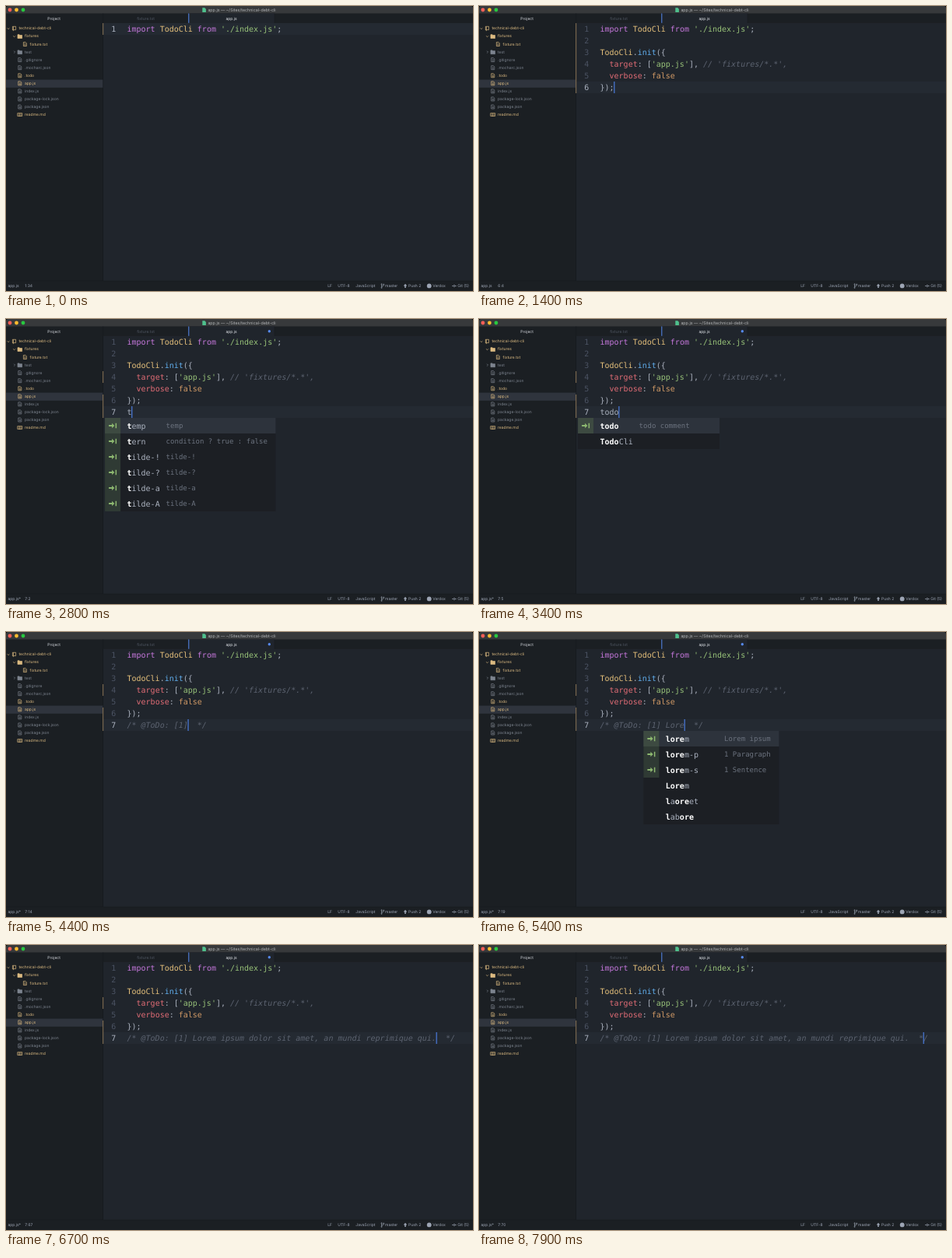
Animation of 600x366 px, one loop 8000 ms. Source, as an HTML page:

```html
<!DOCTYPE html>
<html lang="en">
<head>
<meta charset="utf-8">
<title>Editor typing</title>
<style>
  html, body { margin: 0; width: 100%; height: 100%; overflow: hidden; background: #000; }
  svg { display: block; width: 100vw; height: 100vh; }
  text { white-space: pre; text-rendering: geometricPrecision; }
  .ui { font: 5px Inter, sans-serif; fill: #9da5b4; }
  .mid { text-anchor: middle; }
  .code { font: 10px "DejaVu Sans Mono", monospace; fill: #abb2bf; }
  .label { font-size: 9.03px; fill: #6b727e; }
  .num { text-anchor: end; fill: #4b5363; }
  .num.active { fill: #abb2bf; }
  .kw { fill: #c678dd; }
  .cls { fill: #e5c07b; }
  .str { fill: #98c379; }
  .fn { fill: #61afef; }
  .key { fill: #e06c75; }
  .lit { fill: #d19a66; }
  .note { fill: #5c6370; font-style: italic; }
  .hit { fill: #fff; font-weight: bold; }
  .line { fill: none; stroke-width: .7; }
</style>
</head>
<body>
<svg viewBox="0 0 600 366" preserveAspectRatio="none">
  <path d="M0 366V3Q0 0 3 0H597Q600 0 600 3V366Z" fill="#1b1f23"/>
  <path d="M0 9.5V3Q0 0 3 0H597Q600 0 600 3V9.5Z" fill="#37393b"/>
  <circle cx="5" cy="5" r="2.4" fill="#fe5f57"/>
  <circle cx="13.5" cy="5" r="2.4" fill="#febc2e"/>
  <circle cx="22" cy="5" r="2.4" fill="#28c840"/>
  <path d="M252.3 2.3h3l1.6 1.6v4.1h-4.6z" fill="#4fc08d"/>
  <text class="ui" x="259.4" y="7" style="font-size:5.3px;fill:#b4b6b8">app.js — ~/Sites/technical-debt-cli</text>

  <rect x="125" y="21.8" width="475" height="331.2" fill="#20252c"/>
  <rect x="235" y="9.5" width="110" height="12.5" fill="#20252c"/>
  <path d="M124.6 9.5V353M345 9.5V21.8M0 353H600" stroke="#16191d" stroke-width=".5"/>
  <rect x="234.3" y="9.5" width="1" height="12.3" fill="#568af2"/>
  <text class="ui mid" x="61.5" y="17.6" style="fill:#d7dae0">Project</text>
  <text class="ui mid" x="179.5" y="17.6" style="fill:#505763">fixture.txt</text>
  <text class="ui mid" x="289.5" y="17.6" style="fill:#e4e7ec">app.js</text>

  <rect x="0" y="94.6" width="124.4" height="10.2" fill="#2f343d"/>
  <g id="tree"></g>

  <g class="ui">
    <text x="413.3" y="361.3">LF</text>
    <text x="426.3" y="361.3">UTF-8</text>
    <text x="449.3" y="361.3">JavaScript</text>
    <text x="487" y="361.3">master</text>
    <text x="517" y="361.3">Push 2</text>
    <text x="548.2" y="361.3">Verdox</text>
    <text x="580.3" y="361.3">Git (5)</text>
  </g>
  <g class="line" stroke="#9da5b4">
    <path d="M482.6 357.8v3.4M485.2 358v.6q0 1.2-2.6 1.4"/>
    <circle cx="482.6" cy="357.3" r=".6"/><circle cx="482.6" cy="361.8" r=".6"/><circle cx="485.2" cy="357.6" r=".6"/>
    <path d="M573 359.5h1.7M577 359.5h1.7"/><circle cx="575.9" cy="359.5" r="1.1"/>
  </g>
  <path d="M513 356.8l2.3 2.6h-1.5v2.6h-1.6v-2.6h-1.5z" fill="#9da5b4"/>
  <circle cx="543.7" cy="359.4" r="2.9" fill="#9da5b4"/>

  <g id="live"></g>
</svg>

<script>
const LOOP = 8000, LEFT = 155.5, ADVANCE = 6.02, TOP = 22, PITCH = 15;
const TAN = '#dcbb82', GRAY = '#7d848f';
const tree = document.getElementById('tree');
const live = document.getElementById('live');

const rect = (x, y, w, h, fill) => `<rect x="${x}" y="${y}" width="${w}" height="${h}" fill="${fill}"/>`;
const text = (cls, x, y, body) => `<text class="${cls}" x="${x}" y="${y}">${body}</text>`;
const span = (cls, body) => `<tspan class="${cls}">${body}</tspan>`;

// Project tree: name, kind, indent, colour
const entries = [
  ['technical-debt-cli', 'repo', 16.4, TAN], ['fixtures', 'open', 24, TAN],
  ['fixture.txt', 'file', 30.6, TAN], ['test', 'closed', 24, GRAY],
  ['.gitignore', 'file', 24, GRAY], ['.mocharc.json', 'file', 24, GRAY],
  ['.todo', 'file', 24, TAN], ['app.js', 'file', 24, TAN],
  ['index.js', 'file', 24, GRAY], ['package-lock.json', 'file', 24, GRAY],
  ['package.json', 'file', 24, GRAY], ['readme.md', 'book', 24, TAN]
];
const folder = '<path d="M-2.8-2.2h2.2l.6.8h2.8v4h-5.6z" fill="currentColor"/>';
const down = 'M-8.6-.6l1.4 1.4 1.4-1.4';
const icons = {
  repo: `<path d="M-1.8 2V-2.6H2.4V1.7H-1.8M-.8 1.7V3.2M-.6-2.4V1.4${down}"/>`,
  open: `${folder}<path d="${down}"/>`,
  closed: `${folder}<path d="M-7.6-1.4l1.4 1.4-1.4 1.4"/>`,
  file: '<path d="M-2-2.5H.8L2-1.3V2.5H-2zM-1-.3H1M-1 1.1H1"/>',
  book: '<path d="M-3-1.9H3V1.8H-3zM0-1.9V2.4M-2-.5H-1M1-.5H2M-2 .7H-1M1 .7H2"/>'
};
tree.innerHTML = entries.map(([name, kind, x, color], i) => {
  const y = 28.9 + i * 10.06;
  return `<g class="line" transform="translate(${x - 6.2} ${y})" stroke="currentColor" color="${color}">${icons[kind]}</g>` +
    `<text class="ui" x="${x}" y="${y + 1.5}" style="fill:${color}">${name}</text>`;
}).join('');

const code = [
  `${span('kw', 'import')} ${span('cls', 'TodoCli')} ${span('kw', 'from')} ${span('str', "'./index.js'")};`,
  '',
  `${span('cls', 'TodoCli')}.${span('fn', 'init')}({`,
  `  ${span('key', 'target')}: [${span('str', "'app.js'")}], ${span('note', "// 'fixtures/*.*',")}`,
  `  ${span('key', 'verbose')}: ${span('lit', 'false')}`,
  '});'
];

// Completion lists: column, label position, right edge, items [word, label]
const lists = {
  t: { col: 0, labelX: 205.6, right: 346.5, items: [
    ['temp', 'temp'], ['tern', 'condition ? true : false'], ['tilde-!', 'tilde-!'],
    ['tilde-?', 'tilde-?'], ['tilde-a', 'tilde-a'], ['tilde-A', 'tilde-A']] },
  todo: { col: 0, labelX: 205.6, right: 309, items: [['todo', 'todo comment'], ['TodoCli']] },
  lore: { col: 14, labelX: 315, right: 385.5, items: [
    ['lorem', 'Lorem ipsum'], ['lorem-p', '1 Paragraph'], ['lorem-s', '1 Sentence'],
    ['Lorem'], ['laoreet'], ['labore']] },
  lorem: { col: 14, labelX: 290.8, right: 360.5, items: [
    ['lorem', 'Lorem ipsum'], ['lorem-p', '1 Paragraph'], ['lorem-s', '1 Sentence']] }
};

// Editing steps: time, line, column, typed text, list, selected item
const OPEN = '/* @ToDo: ', CLOSE = '  */';
const note = s => OPEN + s + CLOSE;
const full = note('[1] Lorem ipsum dolor sit amet, an mundi reprimique qui.');
const steps = [
  [0, 1, 34], [1100, 2, 1], [1200, 3, 1], [1400, 6, 4], [2000, 7, 1, ''],
  [2600, 7, 2, 't'], [2700, 7, 2, 't', 't'], [3000, 7, 3, 'to', 'todo'],
  [3100, 7, 4, 'tod', 'todo'], [3200, 7, 5, 'todo', 'todo'],
  [3500, 7, 11, note('')], [4000, 7, 12, note('[]')],
  [4200, 7, 13, note('[1]')], [4400, 7, 14, note('[1]')], [4600, 7, 15, note('[1] ')],
  [4800, 7, 16, note('[1] L')], [4900, 7, 16, note('[1] L'), 'lore'],
  [5000, 7, 17, note('[1] Lo'), 'lore'], [5200, 7, 18, note('[1] Lor'), 'lore'],
  [5400, 7, 19, note('[1] Lore'), 'lore'], [5500, 7, 20, note('[1] Lorem'), 'lorem'],
  [6100, 7, 20, note('[1] Lorem'), 'lorem', 1],
  [6600, 7, 67, full], [7700, 7, 68, full], [7800, 7, 69, full], [7900, 7, 70, full]
];
const cursorOff = [[0, 200], [600, 1100], [1800, 2000], [2400, 2600], [3900, 4000], [5900, 6100], [7000, 7400]];

// Emphasise the letters of a word that match the typed prefix in order
function highlight(word, prefix) {
  let n = 0;
  return [...word].map(c =>
    n < prefix.length && c.toLowerCase() === prefix[n].toLowerCase() ? (n++, span('hit', c)) : c).join('');
}

function popup({ col, labelX, right, items }, prefix, selected) {
  const wordX = LEFT + col * ADVANCE, x = wordX - 28.4, y = 127;
  return rect(x, y, right - x, items.length * 20, '#1c1f24') + items.map(([word, label], i) => {
    const top = y + i * 20, mid = top + 10;
    let row = i === selected ? rect(x, top, right - x, 20, '#2d333c') : '';
    if (label) {
      row += rect(x, top, 20, 20, i === selected ? '#3d4a41' : '#2f3a34') +
        `<path transform="translate(${x + 10} ${mid})" d="M-5-1H-1V-3.2L2.3 0-1 3.2V1H-5zM3.5-3.2H5V3.2H3.5z" fill="#8db870"/>` +
        text('code label', labelX, mid + 3.2, label);
    }
    return row + text('code', wordX, mid + 3.5, highlight(word, prefix));
  }).join('');
}

function draw([time, line, col, typed, list, selected = 0], cursorOn) {
  const rows = time < 1400 ? [...code.slice(0, 1), ...Array(line - 1).fill('')] : [...code];
  if (line === 7) rows.push(typed.startsWith(OPEN) ? span('note', typed) : typed);
  const lineTop = n => TOP + (n - 1) * PITCH;
  const dirty = line === 7 || line === 2 || line === 3;
  const marked = line === 7 ? [4, 6, 7] : rows.map((_, i) => i + 1);

  let out = rect(125, lineTop(line), 475, PITCH, '#242a32');
  out += marked.map(n => rect(124.2, lineTop(n), 1, PITCH, '#8c7557')).join('');
  rows.forEach((body, i) => {
    const y = lineTop(i + 1) + 11.1;
    out += text(i + 1 === line ? 'code num active' : 'code num', 141.2, y, i + 1) + text('code', LEFT, y, body);
  });
  if (cursorOn) out += rect(LEFT + (col - 1) * ADVANCE - .2, lineTop(line), 1, PITCH, '#528bff');
  if (dirty) out += '<circle cx="338.3" cy="15.7" r="1.7" fill="#568af2"/>';
  out += text('ui', 2.4, 361.3, line === 7 ? 'app.js*' : 'app.js') + text('ui', 24.3, 361.3, `${line}:${col}`);
  if (list) {
    const source = lists[list];
    out += popup(source, typed.slice(source.col, col - 1), selected);
  }
  live.innerHTML = out;
}

const start = performance.now();
let shown = '';
function tick() {
  const t = (performance.now() - start) % LOOP;
  const index = steps.findLastIndex(step => step[0] <= t);
  const cursorOn = !cursorOff.some(([from, to]) => t >= from && t < to);
  const key = `${index} ${cursorOn}`;
  if (key !== shown) draw(steps[index], cursorOn);
  shown = key;
  requestAnimationFrame(tick);
}
tick();
</script>
</body>
</html>
```
